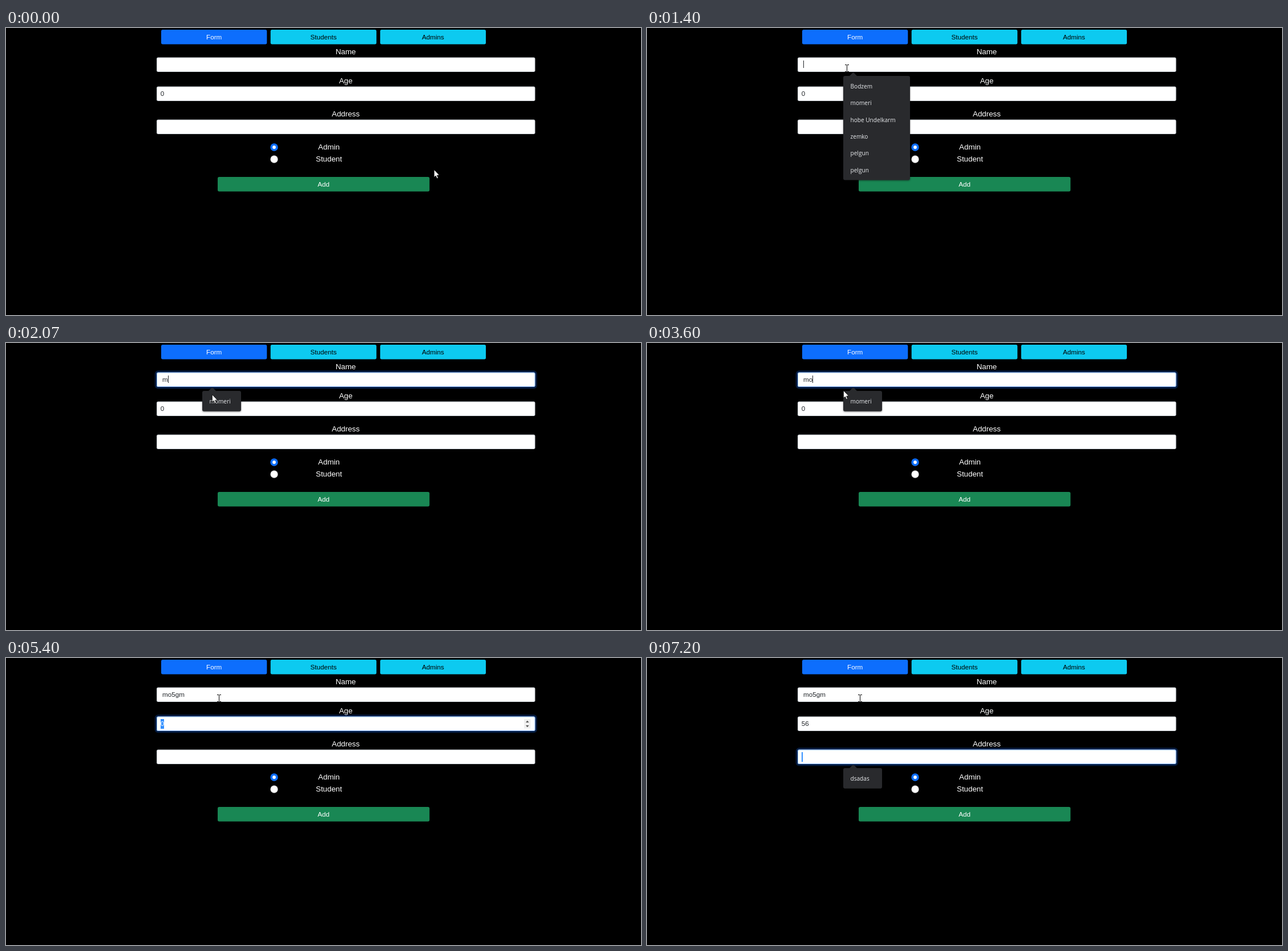
An HTML page with a canvas for the animation above (8 s loop, 1113 by 503 pixels).

```html
<!DOCTYPE html>
<html lang="en">
<head>
<meta charset="utf-8">
<title>Form</title>
<style>
html, body { margin: 0; width: 100%; height: 100%; overflow: hidden; background: #000; }
canvas { display: block; }
</style>
</head>
<body>
<canvas id="stage" width="1113" height="503"></canvas>
<script>
const ctx = document.getElementById('stage').getContext('2d');
const LOOP = 8000;
const SANS = '"Liberation Sans", Arial, sans-serif';
const LABEL = '13.33px ' + SANS, SMALL = '11.67px ' + SANS;
const MENU = '10.1px "Open Sans", "Noto Sans", sans-serif';
const INK = '#212529';
const NAMES = ['Bodzem', 'momeri', 'hobe Undelkarm', 'zemko', 'pelgun', 'pelgun'];
const FIELD_TOPS = [51.5, 102.5, 160.5];

// Pointer positions: time, x, y
const POINTER = [
  [70, 750, 248], [500, 213, 72], [600, 262, 80], [800, 322, 80], [1070, 350, 70],
  [1400, 350, 70], [1600, 361, 90], [3200, 361, 90], [3350, 358, 100],
  [3600, 344, 83], [4000, 373, 70]
];
// Typed text: time, value
const NAME_TYPING = [[0, ''], [2070, 'm'], [2200, 'mo'], [4070, 'mo5'], [4670, 'mo5g'], [4870, 'mo5gm']];
const AGE_TYPING = [[0, '0'], [6600, '5'], [6730, '56']];

const between = (t, a, b) => t >= a && t < b;
const ramp = (t, a, b) => Math.min(1, Math.max(0, (t - a) / (b - a)));
const valueAt = (steps, t) => steps.filter(s => s[0] <= t).pop()[1];

function pointerAt(t) {
  const next = POINTER.findIndex(p => p[0] > t);
  if (next === 0) return POINTER[0].slice(1);
  if (next < 0) return POINTER[POINTER.length - 1].slice(1);
  const [t0, x0, y0] = POINTER[next - 1], [t1, x1, y1] = POINTER[next];
  const k = (t - t0) / (t1 - t0);
  return [x0 + (x1 - x0) * k, y0 + (y1 - y0) * k];
}

function rect(x, y, w, h, fill, r = 0) {
  ctx.fillStyle = fill;
  ctx.beginPath();
  ctx.roundRect(x, y, w, h, r);
  ctx.fill();
}

function disc(x, y, r, fill) {
  ctx.fillStyle = fill;
  ctx.beginPath();
  ctx.arc(x, y, r, 0, 7);
  ctx.fill();
}

function polygon(points, fill) {
  ctx.fillStyle = fill;
  ctx.beginPath();
  points.forEach(([x, y]) => ctx.lineTo(x, y));
  ctx.closePath();
  ctx.fill();
}

function text(str, x, y, font, fill, align = 'left') {
  ctx.font = font;
  ctx.fillStyle = fill;
  ctx.textAlign = align;
  ctx.fillText(str, x, y);
}

function button(str, x, y, w, fill, ink) {
  rect(x, y, w, 25.5, fill, 2.7);
  text(str, x + w / 2, y + 16.8, SMALL, ink, 'center');
}

function field(y, focus, fill = '#fff') {
  if (focus > 0) rect(260.7, y - 3.3, 670.1, 32.1, `rgba(13,110,253,${0.25 * focus})`, 6);
  rect(264, y, 663.5, 25.5, '#ced4da', 2.7);
  if (focus > 0) rect(264, y, 663.5, 25.5, `rgba(134,183,254,${focus})`, 2.7);
  rect(265, y + 1, 661.5, 23.5, fill, 2);
}

function caretAfter(str, x, top) {
  ctx.font = SMALL;
  rect(Math.round(x + ctx.measureText(str).width), top, 1, 13, INK);
}

function menu(items, top, width, hover, alpha = 1) {
  const height = 29.35 * items.length + 6.5, scale = 1 - 0.04 * (1 - alpha);
  const cx = 344 + width / 2, cy = top + height / 2;
  ctx.save();
  ctx.globalAlpha = alpha;
  ctx.translate(cx, cy);
  ctx.scale(scale, scale);
  ctx.translate(-cx, -cy);
  ctx.save();
  ctx.shadowColor = 'rgba(0,0,0,.45)';
  ctx.shadowBlur = 3;
  ctx.shadowOffsetY = 1;
  rect(344, top, width, height, '#292a2d', 3);
  ctx.restore();
  polygon([[354.5, top + 0.5], [360.5, top - 5.5], [362.5, top - 5.5], [368.5, top + 0.5]], '#292a2d');
  if (hover) rect(344, top + 3.3, width, 29.35, '#3f4042');
  items.forEach((item, i) => text(item, 356.5, top + 22 + i * 29.35, MENU, '#e8eaed'));
  ctx.restore();
}

function pointer(x, y) {
  const overField = x > 264 && x < 927 && FIELD_TOPS.some(top => y > top && y < top + 25.5);
  ctx.save();
  if (overField) {
    ctx.translate(Math.round(x), Math.round(y));
    rect(0, -5, 1, 11, '#000');
    rect(-3, -6, 3, 1, '#000');
    rect(1, -6, 3, 1, '#000');
    rect(-3, 6, 3, 1, '#000');
    rect(1, 6, 3, 1, '#000');
  } else {
    ctx.translate(x + 0.3, y + 0.3);
    const arrow = [[0, 0], [0, 13.4], [3, 10.7], [5, 15.4], [7.2, 14.4], [5.2, 9.9], [9.2, 9.6]];
    polygon(arrow, '#fff');
    ctx.strokeStyle = '#000';
    ctx.lineWidth = 0.8;
    ctx.stroke();
  }
  ctx.restore();
}

function drawStatic() {
  rect(0, 0, 1113, 503, '#000');
  button('Form', 272, 3, 185.3, '#0d6efd', '#fff');
  button('Students', 463.7, 3, 185.6, '#0dcaf0', '#000');
  button('Admins', 655.8, 3, 185.3, '#0dcaf0', '#000');
  button('Add', 371, 261, 371.3, '#198754', '#fff');
  [['Name', 595.5, 46], ['Age', 595.5, 97], ['Address', 595.5, 155], ['Admin', 566, 213], ['Student', 566, 234]]
    .forEach(([str, x, y]) => text(str, x, y, LABEL, '#fff', 'center'));
  disc(470, 209, 6.7, '#0d6efd');
  disc(470, 209, 2.9, '#fff');
  disc(470, 230, 6.7, '#bfbfbf');
  disc(470, 230, 6, '#fff');
}

function drawName(t, hover) {
  const typed = valueAt(NAME_TYPING, t);
  field(51.5, ramp(t, 1430, 1580) - ramp(t, 5250, 5400), hover ? '#e8f0fe' : '#fff');
  text(hover ? NAMES[t < 2070 ? 0 : 1] : typed, 274, 68, SMALL, INK);
  if (between(t, 1400, 5270) && !between(t, 2730, 3200) && !hover) caretAfter(typed, 274, 57);
}

function drawAge(t) {
  const typed = valueAt(AGE_TYPING, t), focused = between(t, 5270, 7070);
  const selected = focused && t < 6600;
  field(102.5, ramp(t, 5250, 5400) - ramp(t, 7050, 7200));
  if (selected) rect(271, 107, 6, 17, '#3390ff');
  text(typed, 270.7, 119, SMALL, selected ? '#fff' : INK);
  if (!focused) return;
  if (!selected) caretAfter(typed, 270.7, 109);
  rect(908, 107, 11.5, 16.5, '#efefef');
  polygon([[911, 113], [913.8, 109.8], [916.6, 113]], '#505050');
  polygon([[911, 118], [913.8, 121.2], [916.6, 118]], '#505050');
}

function drawAddress(t) {
  field(160.5, ramp(t, 7050, 7200));
  if (t >= 7070) rect(271, 165, 2, 17, '#3390ff');
}

function draw(t) {
  const [x, y] = pointerAt(t);
  const hover = y >= 88 && (between(t, 1400, 2070) || between(t, 3200, 4000));
  drawStatic();
  drawName(t, hover);
  drawAge(t);
  drawAddress(t);
  if (between(t, 1400, 2070)) menu(NAMES, 84, 117, hover);
  if (between(t, 2070, 4400)) menu([NAMES[1]], 84, 68, hover, 1 - ramp(t, 4190, 4400));
  if (t >= 7200) menu(['dsadas'], 193, 68, false);
  pointer(x, y);
}

const start = performance.now();
function tick() {
  draw((performance.now() - start) % LOOP);
  requestAnimationFrame(tick);
}
tick();
</script>
</body>
</html>
```
